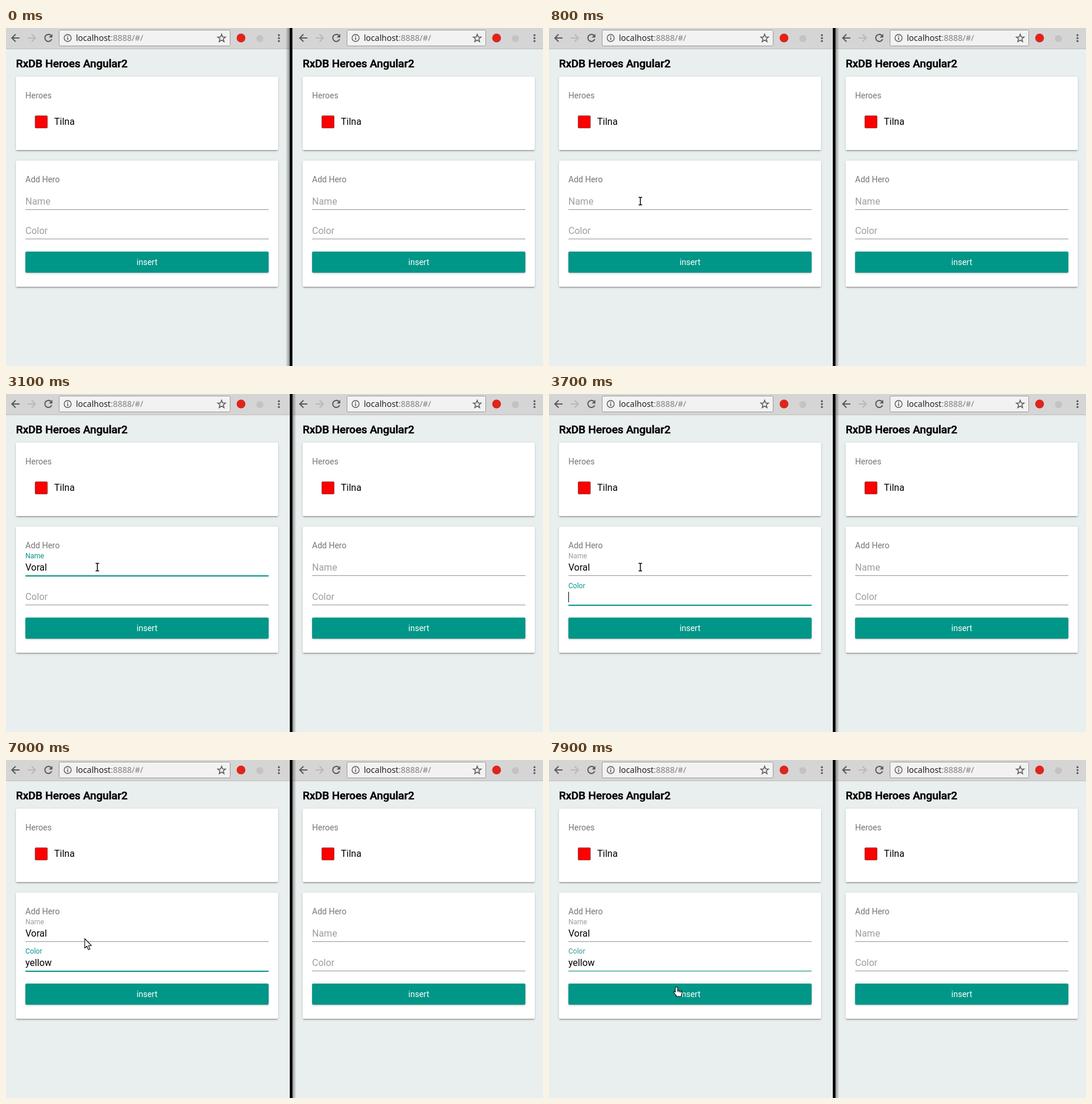
An HTML page for the animation above (8000 ms loop, 914 by 576 pixels).

```html
<!DOCTYPE html>
<html lang="en">
<head>
<meta charset="utf-8">
<title>Heroes</title>
<style>
  html, body { margin: 0; width: 100%; height: 100%; overflow: hidden; background: #e9efee; }
  #stage { position: absolute; left: 0; top: 0; width: 914px; height: 576px; overflow: hidden; }
  .card, .button { position: absolute; border-radius: 2px; }
  .card {
    background: #fff;
    box-shadow: 0 3px 1px -2px rgba(0,0,0,.2), 0 2px 2px rgba(0,0,0,.14), 0 1px 5px rgba(0,0,0,.12);
  }
  .button { background: #009688; box-shadow: 0 1px 3px rgba(0,0,0,.28); }
  svg { position: absolute; left: 0; top: 0; }
  text { font: 16px Roboto, sans-serif; white-space: pre; }
  .small { font-size: 14px; fill: #757575; }
  .title { font-size: 18.72px; font-weight: 500; stroke: #000; stroke-width: .5px; }
  .url { font: 14px "Noto Sans", sans-serif; }
  .white { fill: #fff; }
</style>
</head>
<body>
<div id="stage"></div>
<script>
const LOOP = 8000, TICK = 100, FADE = 400;
const GRAY = [158, 158, 158], TEAL = [0, 150, 136];
const stage = document.getElementById('stage');

function add(parent, tag, attrs, text = '') {
  const el = document.createElementNS('http://www.w3.org/2000/svg', tag);
  for (const key in attrs) el.setAttribute(key, attrs[key]);
  el.textContent = text;
  parent.append(el);
  return el;
}

function box(cls, x, y, w, h) {
  const el = document.createElement('div');
  el.className = cls;
  el.style.cssText = `left:${x}px;top:${y}px;width:${w}px;height:${h}px`;
  stage.append(el);
}

const svg = add(stage, 'svg', { width: 914, height: 576 });
const rect = (x, y, width, height, fill, more) =>
  add(svg, 'rect', { x, y, width, height, fill, ...more });
const label = (x, y, text, more) => add(svg, 'text', { x, y, ...more }, text);
const line = (d, stroke, width = 2) =>
  add(svg, 'path', { d, stroke, 'stroke-width': width, fill: 'none' });
const dot = (cx, cy, r, fill, more) => add(svg, 'circle', { cx, cy, r, fill, ...more });

function starPath(cx, cy, outer, inner) {
  const points = Array.from({ length: 10 }, (_, i) => {
    const r = i % 2 ? inner : outer, a = i * Math.PI / 5 - Math.PI / 2;
    return `${cx + r * Math.cos(a)} ${cy + r * Math.sin(a)}`;
  });
  return `M${points.join('L')}Z`;
}

// left: navigation icons, right: toolbar icons near the window's right edge
function toolbar(x, width, left, right) {
  const ink = '#5a5a5a';
  rect(x, 0, width, 36, '#d5d5d5');
  rect(x, 35, width, 1, '#bdbdbd');
  line(`M${left + 23} 17H${left + 10}M${left + 16.3} 10.7L${left + 10} 17L${left + 16.3} 23.3`, ink);
  line(`M${left + 37} 17H${left + 50}M${left + 43.7} 10.7L${left + 50} 17L${left + 43.7} 23.3`, '#b9b9b9');
  line(`M${left + 76.5} 12.7A6 6 0 1 0 ${left + 77.8} 19`, ink);
  add(svg, 'path', { d: `M${left + 79} 10V16.2H${left + 72.8}Z`, fill: ink });

  rect(left + 90.5, 3.5, right + 381 - left - 90, 27, '#f2f2f2', { rx: 2, stroke: '#999' });
  dot(left + 105, 17, 6, 'none', { stroke: ink, 'stroke-width': 1.4 });
  rect(left + 104.2, 16, 1.6, 4.5, ink);
  rect(left + 104.2, 13.3, 1.6, 1.6, ink);
  const url = label(left + 119, 22, '', { class: 'url' });
  add(url, 'tspan', { fill: '#222' }, 'localhost');
  add(url, 'tspan', { fill: '#808080' }, ':8888/#/');
  line(starPath(right + 367, 17.6, 7, 3), ink, 1.5);

  dot(right + 400, 17, 7.5, '#df241c');
  dot(right + 432, 18, 6, '#c3c3c3');
  for (const y of [12, 17, 22]) dot(right + 464.5, y + .3, 1.7, ink);
}

function field(x, width, y, name) {
  rect(x, y + 8, width, 1, '#949494');
  return {
    y,
    bar: rect(x, y + 8, width, 2, '#009688', { height: 0 }),
    name: label(0, 0, name),
    value: label(x, y, ''),
    caret: rect(x, y - 14, 1, 18, '#000', { visibility: 'hidden' }),
    x
  };
}

function place(f, float, focus, drop = 0) {
  const y = f.y - 21 * float + drop, scale = 1 - .25 * float;
  const rgb = GRAY.map((c, i) => Math.round(c + (TEAL[i] - c) * focus));
  f.name.setAttribute('transform', `translate(${f.x} ${y}) scale(${scale})`);
  f.name.setAttribute('fill', `rgb(${rgb})`);
  f.bar.setAttribute('height', 2 * focus);
  f.bar.setAttribute('opacity', focus);
}

function page(x, width) {
  const inner = x + 16, innerWidth = width - 32;
  box('card', x, 83, width, 125);
  box('card', x, 226, width, 215);
  box('button', inner, 381, innerWidth, 36);
  stage.append(svg);
  label(x, 67, 'RxDB Heroes Angular2', { class: 'title' });
  label(inner, 120, 'Heroes', { class: 'small' });
  rect(x + 32.5, 149.5, 21, 21, '#f00', { rx: 1.5, stroke: '#8a5a5a' });
  label(x + 65, 165, 'Tilna');
  label(inner, 263, 'Add Hero', { class: 'small' });
  label(x + width / 2, 404, 'insert', { class: 'small white', 'text-anchor': 'middle' });
  const fields = [field(inner, innerWidth, 301, 'Name'), field(inner, innerWidth, 351, 'Color')];
  fields.forEach(f => place(f, 0, 0));
  return fields;
}

toolbar(0, 483, 0, 0);
toolbar(488, 426, 490, 435);
const [nameField, colorField] = page(17, 446);
page(505, 395);

// the focused window casts its shadow over the other one
const defs = add(svg, 'defs', {});
function shadow(id, x, from, to) {
  const grad = add(defs, 'linearGradient', { id });
  add(grad, 'stop', { offset: 0, 'stop-opacity': from });
  add(grad, 'stop', { offset: 1, 'stop-opacity': to });
  return rect(x, 0, 7, 576, `url(#${id})`);
}
const leftShadow = shadow('fadeLeft', 476, 0, .4);
const rightShadow = shadow('fadeRight', 487, .4, 0);
rect(483, 0, 4.5, 576, '#000');

const outline = { fill: '#fff', stroke: '#000', 'stroke-width': 1.1, 'stroke-linejoin': 'round' };
const beam = 'M-3 -6.5H-1L0 -5.5L1 -6.5H3M0 -5.5V5.5M-3 6.5H-1L0 5.5L1 6.5H3';
const cursors = { arrow: add(svg, 'g', {}), beam: add(svg, 'g', {}), hand: add(svg, 'g', {}) };
add(cursors.arrow, 'path', {
  d: 'M0 0V16L3.7 12.6L6.2 18.8L9 17.6L6.4 11.7H11.3Z', ...outline
});
add(cursors.beam, 'path', { d: beam, fill: 'none', stroke: '#fff', 'stroke-width': 3.4 });
add(cursors.beam, 'path', { d: beam, fill: 'none', stroke: '#000', 'stroke-width': 1.5 });
add(cursors.hand, 'path', {
  d: 'M-2 1Q0 -1.5 2 1V5.5L8 7Q10 7.6 9.5 10.5L8.3 14V16H-.5V14L-5 9Q-4.5 6.5 -2 8.5Z', ...outline
});
add(cursors.hand, 'path', { d: 'M2 5.5V8.5M4.7 6.5V9M7.3 7.2V9.5', ...outline });

// [time, value...]: each entry holds until the next
const cursorSteps = [
  [0, ''], [100, 'arrow', 466, 13], [200, 'arrow', 300, 215], [300, 'hand', 110, 399],
  [400, 'beam', 60, 345], [500, 'beam', 155.5, 295],
  [4800, 'beam', 151, 298], [4900, 'beam', 142, 302], [5000, 'arrow', 134, 304.5],
  [7100, 'arrow', 141, 311], [7200, 'arrow', 160, 327], [7300, 'beam', 188, 347],
  [7400, 'arrow', 215, 366], [7500, 'hand', 237, 386], [7600, 'hand', 228, 387],
  [7700, 'hand', 217, 387]
];
const nameSteps = [[0, ''], [2000, 'Vo'], [2300, 'Vora'], [3100, 'Voral']];
const colorSteps = [[0, ''], [5300, 'y'], [5900, 'yel'], [6200, 'yell'], [6300, 'yello'], [7000, 'yellow']];
const nameCaret = [[0, false], [900, true], [1800, false], [2000, true], [3100, false]];
const colorCaret = [[0, false], [3300, true], [4300, false], [5300, true], [7000, false]];

const at = (steps, t) => steps.filter(s => s[0] <= t).pop().slice(1);
const ease = (t, start) => 1 - (1 - Math.min(1, Math.max(0, (t - start) / FADE))) ** 3;
const show = (el, on) => el.setAttribute('visibility', on ? 'visible' : 'hidden');

function fill(f, text, caretOn) {
  if (f.value.textContent !== text) f.value.textContent = text;
  const width = text ? f.value.getComputedTextLength() : 0;
  f.caret.setAttribute('x', Math.round(f.x + width));
  show(f.caret, caretOn);
}

function draw(t) {
  const nameIn = ease(t, 850), swap = ease(t, 3250), colorOut = ease(t, 7850);
  place(nameField, nameIn, nameIn - swap);
  place(colorField, swap, swap - colorOut, t >= 3700 && t < 4300 ? .6 : 0);
  fill(nameField, at(nameSteps, t)[0], at(nameCaret, t)[0]);
  fill(colorField, at(colorSteps, t)[0], at(colorCaret, t)[0]);
  show(leftShadow, t < 800);
  show(rightShadow, t >= 800);

  const [kind, x, y] = at(cursorSteps, t);
  for (const key in cursors) show(cursors[key], key === kind);
  if (kind) cursors[kind].setAttribute('transform', `translate(${x} ${y})`);
}

const begin = performance.now();
function tick() {
  const t = (performance.now() - begin) % LOOP;
  draw(Math.floor(t / TICK) * TICK);
  requestAnimationFrame(tick);
}
tick();
</script>
</body>
</html>
```
